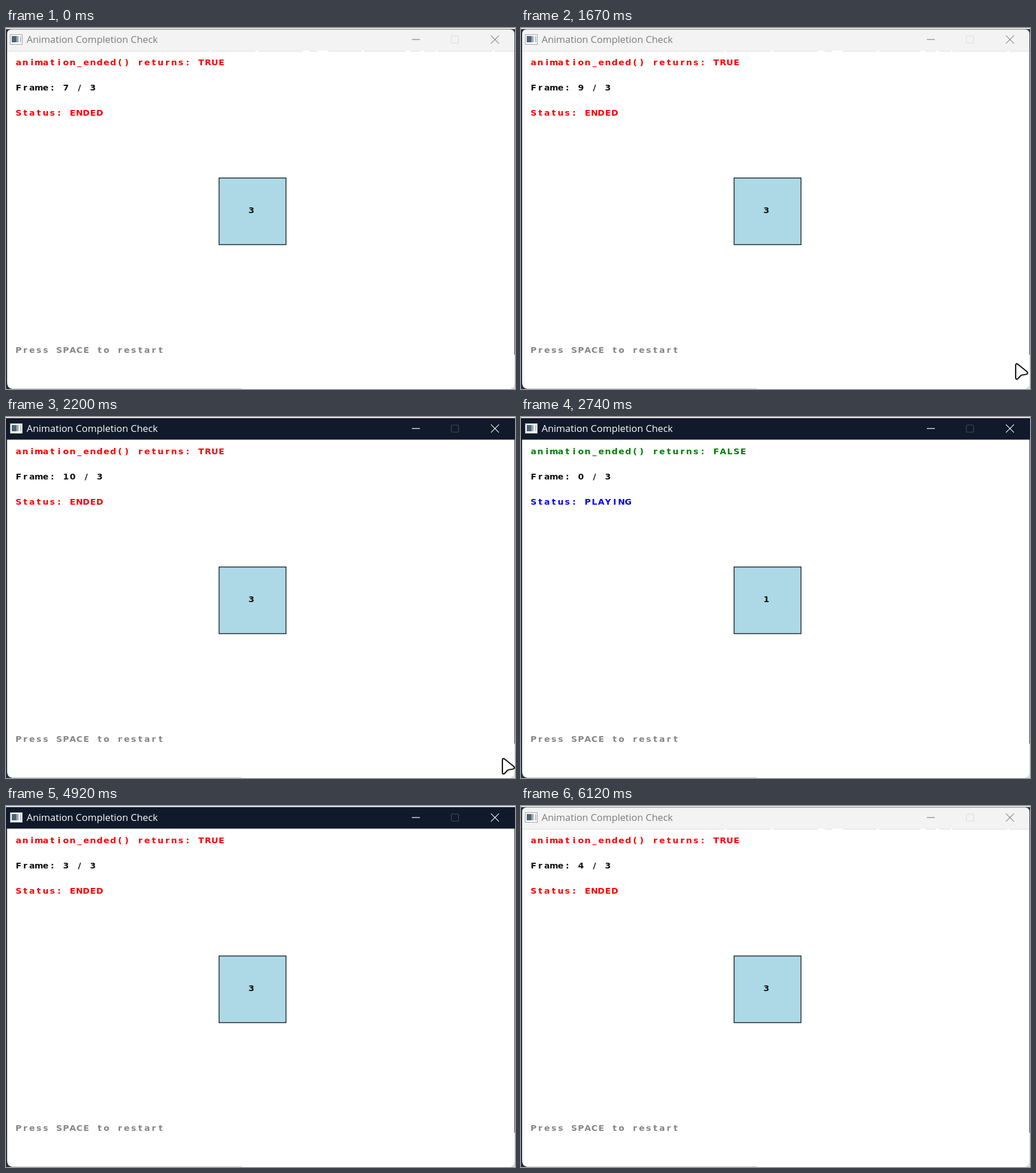
Animation of 888 by 630 pixels, one loop 6.19 s. Source, as an HTML page:

```html
<!DOCTYPE html>
<html lang="en">
<head>
<meta charset="utf-8">
<title>Animation Completion Check</title>
<style>
  html, body { margin: 0; width: 100%; height: 100%; overflow: hidden; background: #fff; }
  svg { display: block; width: 888px; height: 630px; }
  .title { font: 16.9px "Open Sans", "Noto Sans", sans-serif; }
  .cell { font: bold 14.6px "DejaVu Sans", "Noto Sans", sans-serif; text-anchor: middle; white-space: pre; }
</style>
</head>
<body>
<svg viewBox="0 0 888 630">
  <rect width="888" height="630" fill="#2b2d36"/>
  <rect y="570" width="4" height="60" fill="#243140"/>
  <rect x="870" y="570" width="18" height="60" fill="#dcdcde"/>
  <rect width="888" height="2" fill="#e4e1e4"/>
  <rect x="411" y="629" width="470" height="1" fill="#fff"/>
  <path d="M2 30H887V619Q887 629.5 876 629.5H12Q2 629.5 2 618Z" fill="#fff"/>
  <path d="M10 629.5H411" stroke="#c4c4c4"/>

  <path id="bar"/>
  <g id="divider">
    <path d="M2 40.5H887" stroke="#dedede"/>
    <path d="M355 40.5h3M435 40.5h5M518 40.5h12M543 40.5h19M620 40.5h5M697 40.5h8M723 40.5h7M749 40.5h4M848 40.5h4"
          stroke="#fff" stroke-width="2"/>
  </g>
  <rect x="7.5" y="11.5" width="21" height="17" fill="#fff" stroke="#9a9ea3"/>
  <rect x="10" y="14" width="8" height="11" fill="#4d6472"/>
  <rect x="18" y="14" width="4" height="11" fill="#9aa9b3"/>
  <rect x="24" y="14" width="3" height="11" fill="#c9cdd1"/>
  <text id="title" class="title" x="36" y="26">Animation Completion Check</text>
  <g fill="none" stroke-width="1.2">
    <path id="buttons" d="M708 20.2H722M846 13.2L860 27.2M860 13.2L846 27.2"/>
    <rect id="maximize" x="777" y="14" width="12.5" height="12.5" rx="1.5"/>
  </g>

  <rect x="371.7" y="261.7" width="116.8" height="116.4" fill="#add8e6" stroke="#1f2a2e" stroke-width="1.5"/>
  <g class="cell">
    <text id="returns" y="64.6"/>
    <text id="counter" y="108.8" fill="#111"/>
    <text id="status" y="153"/>
    <text id="hint" y="566.8" fill="#868686"/>
    <text id="cellNumber" x="428.2" y="322.9" fill="#111"/>
  </g>

  <circle id="click" cx="864.5" cy="587" r="17.8" fill="#ffff6e" fill-opacity=".9"/>
  <path id="cursor" fill="#fff" stroke="#111" stroke-width="2.2" stroke-linejoin="round"
        d="M863 589Q863 584.5 867 587L882.5 599.5Q886 603.5 881 604.5L874.5 605.5Q872 606 870.5 608L867 612Q863 614.5 863 610Z"/>
</svg>
<script>
const LOOP = 6190;
const ADVANCE = 11.8;
const FIRST_CENTER = 21.9;
const RESTART = 2480;

const el = Object.fromEntries([...document.querySelectorAll("[id]")].map(node => [node.id, node]));

// [start, value] pairs; the value holds until the next start
const counts = [[0, 7], [390, 8], [1190, 9], [2000, 10], [RESTART, 0],
                [3270, 1], [4060, 2], [4920, 3], [5720, 4]];
const cursorOffsets = [[0, null], [790, [19, 28]], [1530, [12, 17]], [1600, [4, 6]], [1670, [0, 0]],
                       [2130, [1, 3]], [2200, [3, 10]], [2270, [5, 20]], [2340, [6, 30]],
                       [2410, [8, 39]], [RESTART, [8.5, 43.5]], [2740, null]];

const valueAt = (steps, t) => steps.findLast(([start]) => start <= t)[1];
const between = (t, from, to) => t >= from && t < to;
const show = (node, visible) => node.setAttribute("visibility", visible ? "visible" : "hidden");

function setAttrs(node, attrs) {
  for (const name in attrs) node.setAttribute(name, attrs[name]);
}

// Centres each character in its cell of the fixed-width grid
function setCells(node, text) {
  if (node.textContent === text) return;
  node.textContent = text;
  node.setAttribute("x", [...text].map((_, i) => (FIRST_CENTER + i * ADVANCE).toFixed(2)).join(" "));
}

function drawTitleBar(active) {
  setAttrs(el.bar, active
    ? { d: "M0 2H888V39.5H0Z", fill: "#101a2a" }
    : { d: "M2 40V10Q2 2.5 10 2.5H879Q887 2.5 887 10V40Z", fill: "#f3f3f3" });
  show(el.divider, !active);
  setAttrs(el.title, { fill: active ? "#fff" : "#7b7b7b" });
  setAttrs(el.buttons, { stroke: active ? "#fff" : "#868686" });
  setAttrs(el.maximize, { stroke: active ? "#424a57" : "#dcdcdc" });
}

function drawProgress(t) {
  const count = valueAt(counts, t);
  const ended = count >= 3;
  setCells(el.returns, `animation_ended() returns: ${ended ? "TRUE" : "FALSE"}`);
  setCells(el.counter, `Frame: ${count} / 3`);
  setCells(el.status, `Status: ${ended ? "ENDED" : "PLAYING"}`);
  setAttrs(el.returns, { fill: ended ? "#ff0000" : "#008000" });
  setAttrs(el.status, { fill: ended ? "#ff0000" : "#0000ff" });
  el.cellNumber.textContent = Math.min(count + 1, 3);
}

function drawCursor(t) {
  const offset = valueAt(cursorOffsets, t);
  show(el.cursor, offset);
  if (offset) setAttrs(el.cursor, { transform: `translate(${offset})` });
  show(el.click, between(t, 1800, 1870));
}

function draw(t) {
  drawTitleBar(between(t, 1800, 6120));
  drawProgress(t);
  drawCursor(t);
}

setCells(el.hint, "Press SPACE to restart");
const began = performance.now();
function tick() {
  draw((performance.now() - began) % LOOP);
  requestAnimationFrame(tick);
}
tick();
</script>
</body>
</html>
```
